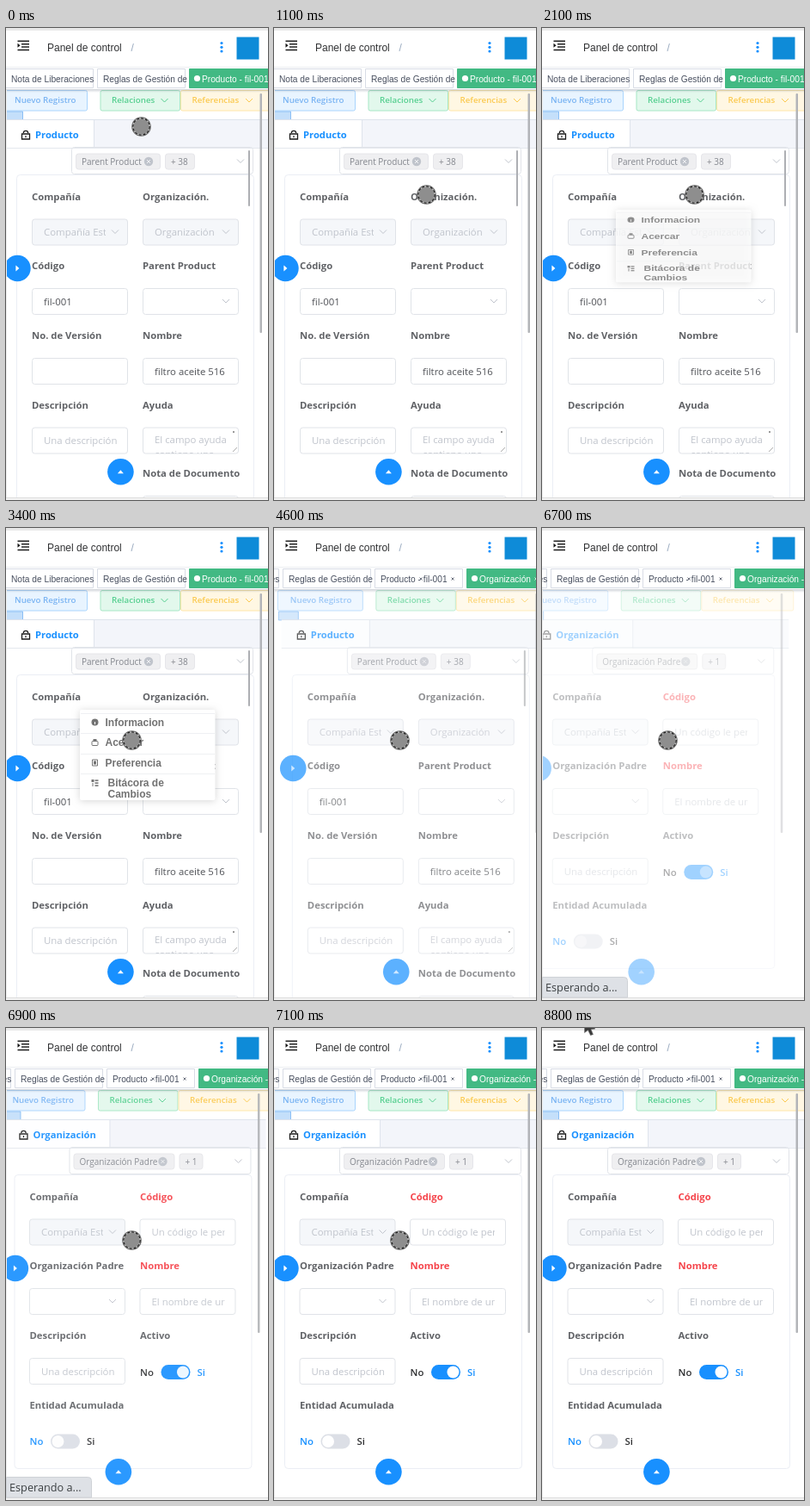
An HTML page with a canvas for the animation above (9.1 s loop, 305 by 548 pixels).

```html
<!DOCTYPE html>
<html lang="es">
<head>
<meta charset="utf-8">
<title>Panel de control</title>
<style>
  html, body { margin: 0; width: 100%; height: 100%; overflow: hidden; background: #fff; }
  canvas { display: block; width: 305px; height: 548px; }
</style>
</head>
<body>
<canvas id="stage"></canvas>
<script>
const W = 305, H = 548, LOOP = 9100, STEP = 100;
const BLUE = '#1890ff', DARK = '#606266', VALUE = '#505257', PALE = '#c0c4cc', LINE = '#e0e3e8', RED = '#f5444b';
const UI = '"Open Sans", "Noto Sans", sans-serif', SYS = '"Liberation Sans", Arial, sans-serif';
const LEFT = 30, RIGHT = 159, FIELD_W = 112;

const canvas = document.getElementById('stage');
const ratio = window.devicePixelRatio || 1;
canvas.width = W * ratio;
canvas.height = H * ratio;
const ctx = canvas.getContext('2d');

const clamp = v => Math.max(0, Math.min(1, v));

// CSS "ease": cubic-bezier(.25, .1, .25, 1)
function ease(x) {
  x = clamp(x);
  const curve = (a, b, s) => 3 * a * s * (1 - s) ** 2 + 3 * b * s * s * (1 - s) + s ** 3;
  let lo = 0, hi = 1;
  for (let i = 0; i < 20; i++) {
    const mid = (lo + hi) / 2;
    if (curve(.25, .25, mid) < x) lo = mid; else hi = mid;
  }
  return curve(.1, 1, lo);
}

function text(str, x, y, color, size = 11.4, weight = 400, family = UI) {
  ctx.font = `${weight} ${size}px ${family}`;
  ctx.fillStyle = color;
  ctx.fillText(str, x, y);
}

function box(x, y, w, h, fill, stroke, r = 0) {
  ctx.beginPath();
  ctx.roundRect(stroke ? x + .5 : x, stroke ? y + .5 : y, stroke ? w - 1 : w, stroke ? h - 1 : h, r);
  if (fill) { ctx.fillStyle = fill; ctx.fill(); }
  if (stroke) { ctx.strokeStyle = stroke; ctx.lineWidth = 1; ctx.stroke(); }
}

function disc(x, y, r, fill) {
  ctx.beginPath();
  ctx.arc(x, y, r, 0, Math.PI * 2);
  ctx.fillStyle = fill;
  ctx.fill();
}

function path(points, { fill, stroke, width = 1, close = false }) {
  ctx.beginPath();
  points.forEach(([x, y]) => ctx.lineTo(x, y));
  if (close) ctx.closePath();
  if (fill) { ctx.fillStyle = fill; ctx.fill(); }
  if (stroke) { ctx.strokeStyle = stroke; ctx.lineWidth = width; ctx.stroke(); }
}

const chevron = (x, y, color = PALE, r = 4) =>
  path([[x - r, y - r / 2], [x, y + r / 2], [x + r, y - r / 2]], { stroke: color });

function cross(x, y, r, color) {
  path([[x - r, y - r], [x + r, y + r]], { stroke: color, width: .8 });
  path([[x + r, y - r], [x - r, y + r]], { stroke: color, width: .8 });
}

function clipped(x, y, w, h, draw) {
  ctx.save();
  ctx.beginPath();
  ctx.rect(x, y, w, h);
  ctx.clip();
  draw();
  ctx.restore();
}

const label = (str, x, y, color = DARK) => text(str, x, y + 4, color, 11.3, 700);

function field(x, y, value, { color = PALE, disabled = false, select = false } = {}) {
  box(x, y, FIELD_W, 31, disabled ? '#f5f7fa' : '#fff', LINE, 3);
  const room = FIELD_W - 14 - (select ? 25 : 12);
  clipped(x + 13, y, room, 30, () => text(value, x + 14, y + 19.5, color));
  if (select) chevron(x + 97, y + 15);
}

function toggle(x, y, on) {
  box(x, y - 8.5, 34, 17, on ? BLUE : '#dcdfe6', null, 8.5);
  disc(on ? x + 25.5 : x + 8.5, y, 7, '#fff');
  text('No', x - 24.5, y + 4, on ? '#303133' : BLUE, 11.4, 600);
  text('Si', x + 42, y + 4, on ? BLUE : '#303133', 11.4, 600);
}

function actionButton(x, w, str, textX, fill, border, color, chevronX) {
  box(x, 72, w, 24.5, fill, border, 2);
  text(str, textX, 87, color, 9.75, 600);
  if (chevronX) chevron(chevronX, 84, color);
}

function lock(x, y) {
  path([[x - 4.5, y - 1], [x + 4.5, y - 1], [x + 4.5, y + 5], [x - 4.5, y + 5]],
    { stroke: '#1a1a1a', width: 1.3, close: true });
  ctx.beginPath();
  ctx.arc(x, y - 2, 2.7, Math.PI, 0);
  ctx.stroke();
  box(x - .6, y + 1, 1.2, 2.2, '#1a1a1a');
}

function roundButton(x, y, angle) {
  disc(x, y, 15.3, BLUE);
  ctx.save();
  ctx.translate(x, y);
  ctx.rotate(angle);
  path([[-3.5, 2], [3.5, 2], [0, -2]], { fill: '#fff' });
  ctx.restore();
}

function pageFrame(title, tabEnd, tag, tagEnd, more, cardBottom) {
  actionButton(-5, 100, 'Nuevo Registro', 10, '#e8f4ff', '#a9d4fd', '#7ab4f3');
  actionButton(109.5, 93.5, 'Relaciones', 123, '#e2f8ec', '#a5e6c4', '#56cf90', 184.5);
  actionButton(203, 108, 'Referencias', 216.5, '#fff7e3', '#ffe6a6', '#fbc94f', 283);
  box(-4, 96.5, 24, 11, '#c4dffa', '#8bbff5');

  box(0, 106, W, 34, '#f3f5fa');
  box(0, 106, W, 1, '#dde3ec');
  box(0, 139, W, 1, '#e4e8ee');
  box(0, 107, tabEnd, 33, '#fff');
  box(tabEnd, 107, 1, 33, '#dfe4ec');
  lock(23, 124);
  text(title, 34, 128, BLUE, 11.2, 700);

  box(12, 170, 277, cardBottom - 170, null, '#ebeef5', 4);
  box(76, 138, 212, 32, '#fff', LINE, 3);
  box(0, 139, W, 1, '#e4e8ee');
  box(81, 145.5, tagEnd - 81, 19, '#efeff1', '#e6e6ea', 3);
  text(tag, 88, 158.5, '#83868d', 10);
  disc(tagEnd - 14, 155, 5.2, PALE);
  cross(tagEnd - 14, 155, 2, '#fff');
  box(tagEnd + 5, 145.5, more === '+ 38' ? 35 : 28, 19, '#efeff1', '#e6e6ea', 3);
  text(more, tagEnd + 12, 158.5, '#83868d', 10);
  chevron(273, 154.5);
}

function pageControls() {
  box(295.5, 76, 2.5, 278, '#b2b4b8', null, 1);
  roundButton(13.4, 279, Math.PI / 2);
  roundButton(133.4, 515.3, 0);
}

function productPage() {
  pageFrame('Producto', 102, 'Parent Product', 180, '+ 38', 570);
  box(282, 142, 2, 65, '#adafb3', null, 1);
  label('Compañía', LEFT, 196);
  label('Organización.', RIGHT, 196);
  field(LEFT, 221.5, 'Compañía Estándar', { disabled: true, select: true });
  field(RIGHT, 221.5, 'Organización', { disabled: true, select: true });
  label('Código', LEFT, 276);
  label('Parent Product', RIGHT, 276);
  field(LEFT, 302, 'fil-001', { color: VALUE });
  field(RIGHT, 302, '', { select: true });
  label('No. de Versión', LEFT, 357);
  label('Nombre', RIGHT, 357);
  field(LEFT, 383, '');
  field(RIGHT, 383, 'filtro aceite 516', { color: VALUE });
  label('Descripción', LEFT, 438);
  label('Ayuda', RIGHT, 438);
  field(LEFT, 463.5, 'Una descripción');
  box(RIGHT, 463.5, FIELD_W, 31, '#fff', LINE, 3);
  clipped(RIGHT, 464, FIELD_W, 30, () => {
    text('El campo ayuda', RIGHT + 14, 482, PALE);
    text('contiene una', RIGHT + 14, 499, PALE);
  });
  box(264, 468, 2, 2, '#9a9a9a');
  path([[264, 492], [269, 487]], { stroke: '#999', width: .8 });
  label('Nota de Documento', RIGHT, 517);
  field(RIGHT, 543, '');
  pageControls();
}

function organizationPage() {
  pageFrame('Organización', 123, 'Organización Padre', 199, '+ 1', 512);
  label('Compañía', LEFT, 196);
  label('Código', RIGHT - .5, 196, RED);
  field(LEFT - .5, 221.5, 'Compañía Estándar', { disabled: true, select: true });
  field(RIGHT - 1, 221.5, 'Un código le permite');
  label('Organización Padre', LEFT, 276);
  label('Nombre', RIGHT - .5, 276, RED);
  field(LEFT - .5, 302, '', { select: true });
  field(RIGHT - 1, 302, 'El nombre de una');
  label('Descripción', LEFT, 357);
  label('Activo', RIGHT - .5, 357);
  field(LEFT - .5, 383, 'Una descripción');
  toggle(183, 399.5, true);
  label('Entidad Acumulada', LEFT, 438);
  toggle(54.5, 480, false);
  pageControls();
}

function header() {
  box(0, 0, W, 72, '#fff');
  box(0, 0, W, 3, '#e9e9e9');
  [[13.5, 14.5], [18, 18], [18, 21.3], [13.5, 24.8]].forEach(([x, y]) => box(x, y, 27 - x, 1.4, '#111'));
  path([[13.5, 17.8], [16.5, 20.3], [13.5, 22.8]], { fill: '#111' });
  text('Panel de control', 48, 27, '#303133', 12, 400, SYS);
  text('/', 145.5, 27, '#97a8be', 12, 400, SYS);
  [17.5, 22.3, 27].forEach(y => disc(251, y, 1.6, BLUE));
  box(268.5, 10.5, 26, 26, '#0e8bd8');
  box(0, 45, W, 1, '#eceef1');
}

function tab(x, str, active) {
  box(x, 47, 103, 23, active ? '#42b983' : '#fff', active ? '#42b983' : '#d8dce5');
  if (active) disc(x + 9.5, 58.5, 3.6, '#fff');
  const start = x + (active ? 15 : 7);
  text(str, start, 63, active ? '#fff' : '#495060', 10.2, 400, SYS);
  if (!active && str.startsWith('Producto')) {
    cross(start + 47, 59, 1.5, '#495060');
    cross(start + 84, 59, 1.5, '#495060');
  }
}

function tabs(t) {
  const moved = t >= 4600;
  const shift = moved ? -96 : 0;
  tab(-1 + shift, 'Nota de Liberaciones', false);
  tab(106 + shift, 'Reglas de Gestión de', false);
  tab(213 + shift, 'Producto - fil-001', !moved);
  if (moved) {
    tab(224, t < 6400 ? 'Organización' : 'Organización -', true);
    if (t < 6400) cross(305, 59, 1.5, '#fff');
  }
  const shade = ctx.createLinearGradient(0, 71, 0, 75);
  shade.addColorStop(0, 'rgba(120,130,145,.35)');
  shade.addColorStop(1, 'rgba(120,130,145,0)');
  box(0, 71, W, 4, shade);
}

function slidPage(draw, dx, alpha) {
  clipped(0, 72, W, 473, () => {
    ctx.globalAlpha = alpha;
    ctx.translate(dx, 0);
    draw();
  });
}

function page(t) {
  if (t < 4900) {
    const p = ease((t - 4500) / 500);
    slidPage(productPage, 30 * p, 1 - p);
  } else if (t >= 6600) {
    const p = ease((t - 6575) / 500);
    slidPage(organizationPage, -30 * (1 - p), p);
  }
}

function menuIcon(i, x, y) {
  const c = '#747474';
  if (i === 0) { disc(x, y, 4, c); box(x - .5, y - .5, 1, 3, '#fff'); }
  if (i === 1) { box(x - 4, y - 2, 8, 6, null, c, 1); box(x - 2, y - 4, 4, 2, c); }
  if (i === 2) { box(x - 3.5, y - 4, 7, 8, null, c); box(x - 1.5, y - 2, 3, 4, c); }
  if (i === 3) {
    box(x - 4, y - 4, 3, 3, c);
    [-3, 0, 3].forEach(d => box(x, y + d - .7, 4, 1.6, c));
    box(x - 3, y, 1, 4, c);
  }
}

function contextMenu(t) {
  if (t < 2000 || t >= 4200) return;
  const p = ease((t - 1900) / 400);
  ctx.save();
  ctx.globalAlpha = p;
  ctx.translate(0, 211);
  ctx.scale(1, p);
  ctx.translate(0, -211);
  ctx.shadowColor = 'rgba(0,0,0,.16)';
  ctx.shadowBlur = 8;
  ctx.shadowOffsetY = 1;
  box(86, 211, 157.5, 105, '#fff', null, 2);
  ctx.shadowColor = 'transparent';
  [215, 238, 262, 285].forEach(y => box(87, y, 156, 1, '#eff0f3'));
  ['Informacion', 'Acercar', 'Preferencia', 'Bitácora de'].forEach((str, i) => {
    const y = 225.5 + i * 23.5;
    menuIcon(i, 103.5, y);
    text(str, i === 3 ? 118.5 : 115.5, y + 4, '#727272', 12, 700, SYS);
  });
  text('Cambios', 118.5, 313, '#727272', 12, 700, SYS);
  ctx.restore();
}

function status(t) {
  if (t < 6400 || t >= 7100) return;
  box(0, 521, 100, 24.5, '#dee1e6', '#cfd2d7', [0, 4, 0, 0]);
  text('Esperando a...', 4, 538, '#3c4043', 12.7);
}

function touchPoint(t) {
  const mix = (a, b, p) => a.map((v, i) => v + (b[i] - v) * p);
  const start = [157.5, 114.5], near = [174.5, 188.5], label = [177.5, 193.5], item = [146.5, 246.5];
  if (t < 900) return mix(start, near, clamp((t - 400) / 400));
  if (t < 3400) return mix(near, label, clamp((t - 900) / 200));
  if (t >= 3700 && t < 3800) return [146.5, 255.5];
  return t < 7800 ? item : [73, 133.5];
}

function pointer(t) {
  if (t >= 8300) {
    const [x, y] = t < 8800 ? [61.5, .5] : [49.5, -11.5];
    const arrow = [[0, 0], [0, 17], [4, 14], [7, 20], [10, 19], [7.5, 13], [12.5, 12.5]];
    path(arrow.map(([a, b]) => [x + a, y + b]), { fill: '#3a3a3a', stroke: '#777', width: .6, close: true });
    return;
  }
  const [x, y] = touchPoint(t);
  disc(x, y, 11.3, '#6a6a6a');
  disc(x, y, 10.5, '#8e8e8e');
  ctx.beginPath();
  ctx.arc(x, y, 9.7, 0, Math.PI * 2);
  ctx.lineWidth = 1.3;
  ctx.strokeStyle = '#bcbcbc';
  ctx.stroke();
  ctx.setLineDash([3, 2]);
  ctx.strokeStyle = '#222';
  ctx.stroke();
  ctx.setLineDash([]);
}

function draw(now) {
  const t = Math.floor((now % LOOP) / STEP) * STEP;
  ctx.setTransform(ratio, 0, 0, ratio, 0, 0);
  box(0, 0, W, H, '#fff');
  page(t);
  header();
  tabs(t);
  box(0, 545, W, 3, '#f4f4f4');
  box(0, 545, W, 1, '#dcdcdc');
  box(0, 72, 1, 473, '#eeeeee');
  contextMenu(t);
  status(t);
  pointer(t);
}

const begin = performance.now();
function tick() {
  draw(performance.now() - begin);
  requestAnimationFrame(tick);
}
tick();
</script>
</body>
</html>
```
